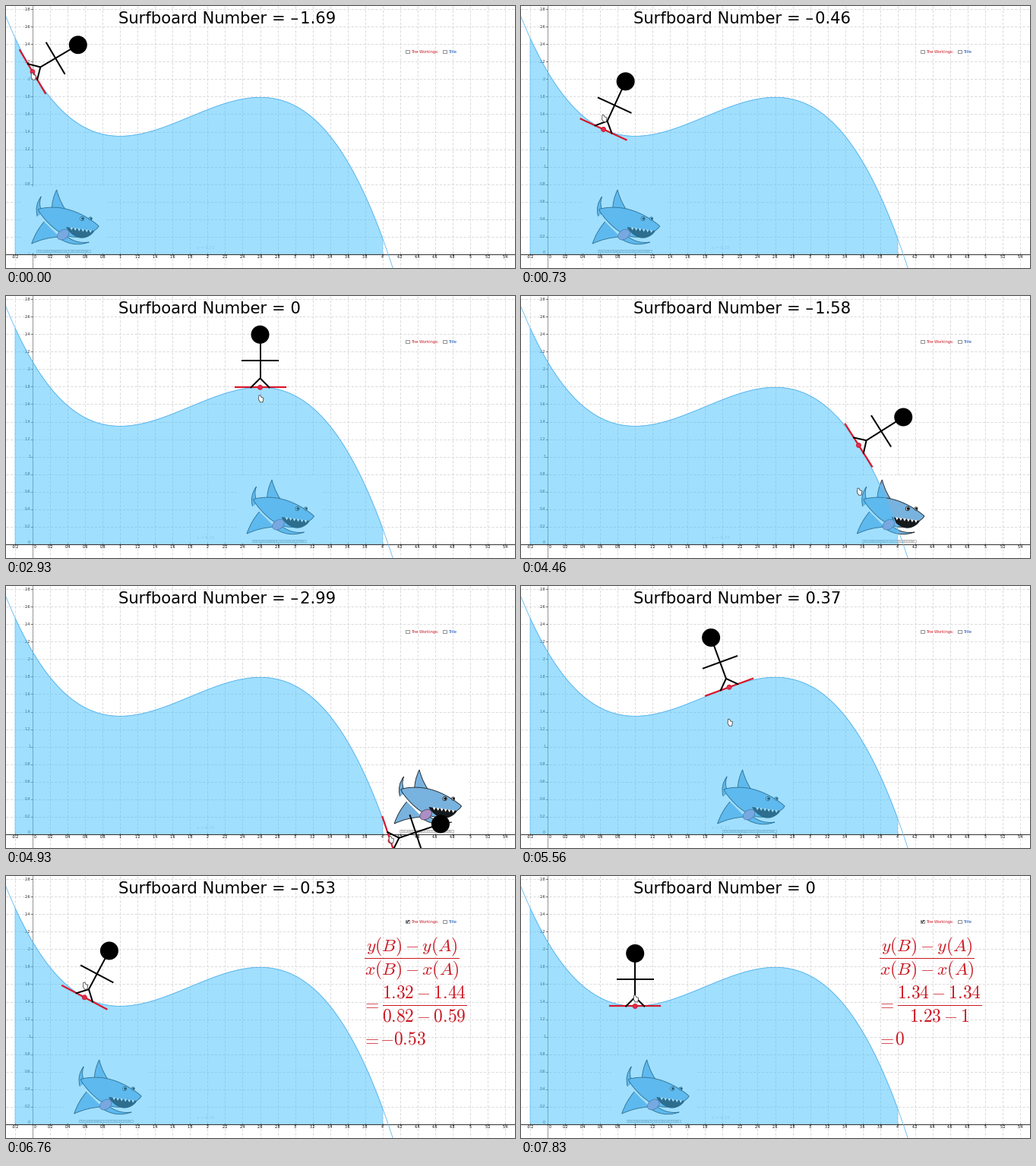
A matplotlib script that plays this animation: 670 by 345 pixels, repeating every 8000 ms.

```python
import numpy as np
import matplotlib.pyplot as plt
from matplotlib.animation import FuncAnimation
from matplotlib.collections import LineCollection
from matplotlib.patches import Circle, Ellipse, PathPatch, Polygon, Rectangle
from matplotlib.path import Path
from matplotlib.transforms import Affine2D

W, H, DPI = 670, 345, 100
PT = 72 / DPI
X0, Y0, UNIT = 35, 326.3, 115.2
STEP, LOOP = 40, 8000
HALF_BOARD = 33
WORKINGS_AT = 6160
RED = "#cc1823"

plt.rcParams["font.family"] = "DejaVu Sans"
fig = plt.figure(figsize=(W / DPI, H / DPI), dpi=DPI, facecolor="white")
ax = fig.add_axes([0, 0, 1, 1])
ax.set(xlim=(0, W), ylim=(H, 0))
ax.axis("off")


def wave(x):
    return 2.081 - 0.65 * (x**3 / 3 - 1.8 * x**2 + 2.6 * x)


def slope(x):
    return -0.65 * (x - 1) * (x - 2.6)


def px(x):
    return X0 + UNIT * x


def py(y):
    return Y0 - UNIT * y


def num(v):
    s = f"{v:.2f}".rstrip("0").rstrip(".")
    return "0" if s == "-0" else s


def label(x, y, s, size, color="black", z=7, **kw):
    return ax.text(x, y, s, fontsize=size * PT, color=color, zorder=z, **kw)


def line(xs, ys, width, color="black", z=6, **kw):
    return ax.plot(xs, ys, color=color, lw=width * PT, zorder=z, **kw)[0]


# Grid, axes and tick labels; half a pixel keeps level lines crisp
ticks_x = np.arange(-1, 28) * 0.2
ticks_y = np.arange(0, 15) * 0.2
grid = [[(px(v), 0), (px(v), H)] for v in ticks_x]
grid += [[(0, py(v) + 0.5), (W, py(v) + 0.5)] for v in ticks_y]
ax.add_collection(LineCollection(grid, colors="#d2d2d2", linewidths=0.8 * PT,
                                 linestyles=(0, (4, 2.6)), zorder=1))
line([X0, X0], [0, H], 0.8, "#808080", 2)
line([0, W], [Y0 + 0.5] * 2, 1, "#333333", 5)
for v in ticks_x:
    line([px(v)] * 2, [Y0, Y0 + 2], 0.8, "#444444", 5)
    label(px(v) + (3.5 if abs(v) < 0.01 else 0), 331, num(v), 4.7, z=5,
          ha="center", va="center")
for v in ticks_y:
    line([X0 - 2, X0], [py(v) + 0.5] * 2, 0.8, "#555555", 2)
    label(32, py(v) - (2 if v < 0.01 else 0), num(v), 4.7, "#333333", 2,
          ha="right", va="center_baseline")

# Water
xs = np.linspace(-0.2, 4, 200)
water = np.column_stack([px(xs), py(wave(xs))])
water = np.vstack([water, [px(4), Y0], [px(-0.2), Y0]])
ax.add_patch(Polygon(water, fc=(0.27, 0.757, 1, 0.5), ec="none", zorder=4))
edge = Polygon(water, fc="none", ec="#74c6f5", zorder=4.5)
ax.add_patch(edge)
xs = np.linspace(-0.35, 4.2, 240)
line(px(xs), py(wave(xs)), 0.8, "#5ab6ee", 5)
label(263, 319, "a = 8.33", 5.4, "#8accee", 4.6, ha="center", va="center")

# Shark picture, placed relative to the left end of the board
shift = Affine2D()
shark_tr = shift + ax.transData


def shark(patch, z):
    patch.set(transform=shark_tr, zorder=z)
    ax.add_patch(patch)


def lens(start, end, up, down, power):
    """Outline bulging above and below the line from start to end."""
    s = np.linspace(0, 1, 40)
    mid = np.outer(1 - s, start) + np.outer(s, end)
    bulge = np.sin(np.pi * s) ** power
    top = mid - np.outer(bulge, (0, up))
    bottom = mid + np.outer(bulge, (0, down))
    return np.vstack([top, bottom[::-1]])


def fin(a, tip, b, bow=0.12):
    """Swept fin: bulging leading edge, hollow trailing edge."""
    a, tip, b = map(np.array, (a, tip, b))

    def bend(p, q, k):
        d = q - p
        return (p + q) / 2 + k * np.array([-d[1], d[0]])

    return PathPatch(Path([a, bend(a, tip, -bow), tip, bend(tip, b, bow), b],
                          [Path.MOVETO] + [Path.CURVE3] * 4), **SKIN)


SKIN = dict(fc="#78b2de", ec="#1c2830", lw=0.9 * PT)
shark(Rectangle((2, 238), 111, 87, fc="white", ec="none"), 3)
shark(fin((42, 270), (48.5, 242), (66, 276)), 3.1)
shark(fin((23, 277), (28, 251), (30, 272), 0.25), 3.1)
shark(fin((52, 304), (15.5, 313), (32, 284), -0.1), 3.1)
shark(fin((58, 300), (91, 311), (52, 306), -0.25), 3.1)
shark(Polygon(lens((24, 268), (104, 290), 11, 24, 0.8), **SKIN), 3.2)
shark(Polygon(lens((61, 291), (98, 296), 0, 12, 0.7), fc="#15191c", ec="none"), 3.3)
shark(Ellipse((57, 301), 17, 12, angle=-35, fc="#ab8fc4", ec="#4a3a58", lw=0.5), 3.5)
for i in range(6):
    x, y = 66 + 5 * i, 291.3 + 0.7 * i
    shark(Polygon([(x, y), (x + 4, y + 0.6), (x + 2, y + 4)], fc="white"), 3.4)
for x, r in ((82, 2.6), (93, 2.1)):
    shark(Circle((x, 280), r, fc="white", ec="black", lw=0.5), 3.5)
    shark(Circle((x + 0.5, 280), r * 0.65, fc="black"), 3.6)
shark(Rectangle((22, 320.8), 71, 3.6, fc="white", ec="#909090", lw=0.4), 3.5)
label(57.5, 322.6, "Free cartoon drawing for use in class and at home", 2.6,
      "#777777", 3.6, ha="center", va="center_baseline", transform=shark_tr)

# Surfer, in board coordinates: x along the board, y away from the water
pose = Affine2D()
pose_tr = pose + ax.transData
line([-HALF_BOARD, HALF_BOARD], [0, 0], 2.2, "#d8182c", 6, transform=pose_tr)
for sx, sy in (([-12, 0, 12], [0, 12, 0]), ([0, 0], [12, 60]),
               ([-23.5, 23.5], [35, 35])):
    line(sx, sy, 2, z=6.2, transform=pose_tr)
ax.add_patch(Circle((0, 69.5), 12, fc="black", ec="none", zorder=6.2,
                    transform=pose_tr))
ax.add_patch(Circle((0, 0), 3, fc="#ee2846", ec="#b81c34", lw=0.6,
                    zorder=6.4, transform=pose_tr))

# Hand pointer
hand_pts = np.array([(-3, -4.5), (-1, -4.5), (0, -2), (3, -1), (2, 4.5),
                     (-1.5, 4.5), (-3.5, 1)])
hand = Polygon(hand_pts, fc="white", ec="#444444", lw=0.6, zorder=8)
ax.add_patch(hand)

# Heading and check boxes
title = label(147.5, 22.6, "", 21.1)
for x, s, c in ((526, "The Workings:", RED), (575, "Title", "#1450c0")):
    ax.add_patch(Rectangle((x, 57.5), 4.6, 4.6, fc="white", ec="#666666",
                           lw=0.5, zorder=7))
    label(x + 6.8, 60.4, s, 5.1, c, va="center_baseline")
tick = line([527, 528.3, 530.3], [60, 61.4, 58.4], 0.9, z=8)


# Worked gradient
def maths(x, y, s="", ha="center"):
    return label(x, y, s, 23.4, RED, ha=ha, va="baseline", math_fontfamily="cm")


top, bottom = maths(550.5, 160.5), maths(550.5, 191.5)
result = maths(492, 222, ha="left")
workings = [
    tick, top, bottom, result,
    maths(534, 99.5, "$y(B)-y(A)$"), maths(534, 130.5, "$x(B)-x(A)$"),
    maths(467.5, 175, "${=}$", "left"), maths(467.5, 222, "${=}$", "left"),
    line([472, 596], [108, 108], 1, RED, 7),
    line([496, 606], [170, 170], 1, RED, 7),
]

# Drags: start and end in ms, x reached, ease-out power, pointer drop in px
DRAGS = [
    (200, 1030, 1, 1, -8),
    (1970, 2430, 1.75, 1, 4),
    (2600, 2930, 2.6, 1, 15),
    (3800, 4130, 3.1, 1, 4),
    (4325, 5000, 4.09, 3, -2),
    (5360, 6090, 0, 2, 6),
    (6190, 7160, 0.992, 1, -9),
    (7360, 7530, 1, 1, -10),
]


def ease_out(u, power):
    return 1 - (1 - u) ** power


def ride(t):
    """Board x and pointer height; the pointer cuts across the wave."""
    x, hy = 0, py(wave(0)) + 6
    for start, end, goal, power, drop in DRAGS:
        u = ease_out(np.clip((t - start) / (end - start), 0, 1), power)
        x += (goal - x) * u
        hy += (py(wave(goal)) + drop - hy) * ease_out(u, 1.5)
    return x, hy


def draw(i):
    t = i * STEP + 10
    x, hy = ride(t)
    y, m = wave(x), slope(x)
    cx, angle = px(x), np.arctan(m)

    pose.clear().scale(1, -1).rotate(-angle).translate(cx, py(y))
    shift.clear().translate(cx - HALF_BOARD * np.cos(angle), 0)
    hand.set_xy(hand_pts + (cx + 1.5, hy))
    edge.set_linewidth((1.4 if 3260 <= t < 3630 else 0.7) * PT)

    value = num(m)
    title.set_text("Surfboard Number = " + value.replace("-", "–\u200a"))
    top.set_text(f"${num(y + 0.23 * m)}-{num(y)}$")
    bottom.set_text(f"${num(x + 0.23)}-{num(x)}$")
    result.set_text("$" + value.replace("-", "{-}") + "$")
    for item in workings:
        item.set_visible(t >= WORKINGS_AT)


ani = FuncAnimation(fig, draw, frames=LOOP // STEP, interval=STEP,
                    init_func=lambda: draw(0), repeat=True, repeat_delay=0)
plt.show()
```
